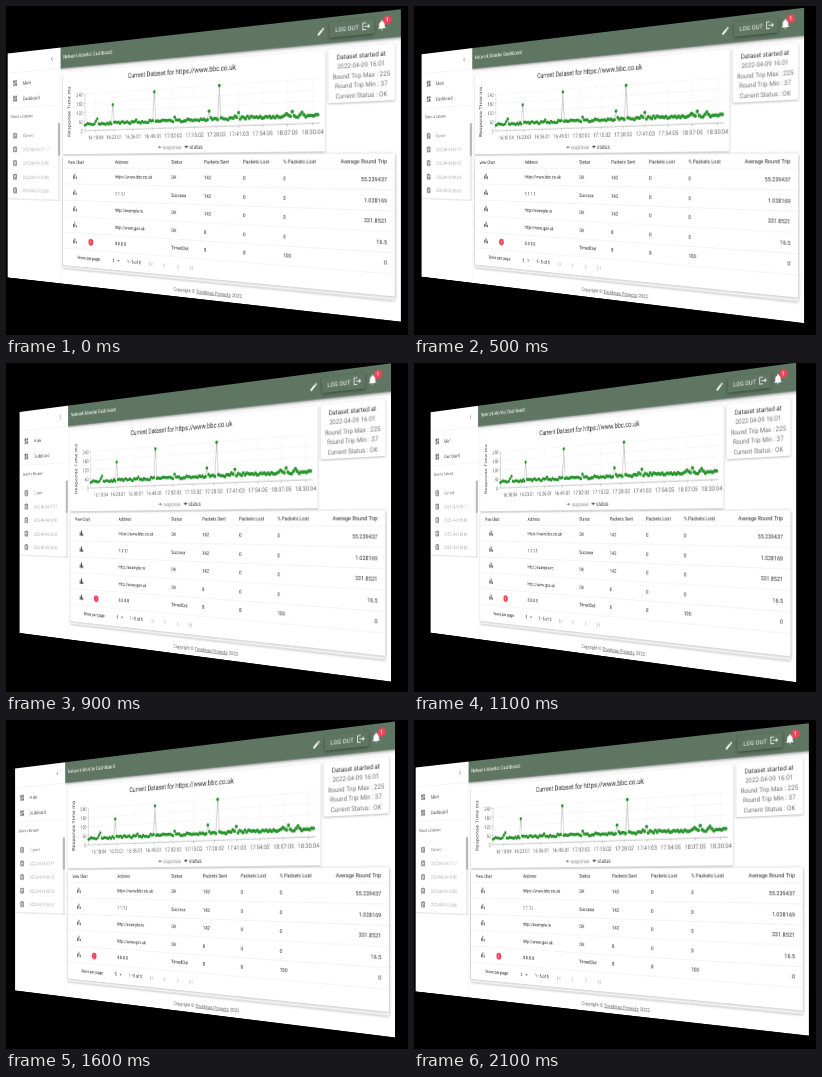
Write an HTML page that moves like this. It is 402 by 329 pixels and loops after 2.3 s.

```html
<!DOCTYPE html>
<html lang="en">
<head>
<meta charset="utf-8">
<title>Network Monitor Dashboard</title>
<style>
  html, body { margin: 0; width: 100%; height: 100%; overflow: hidden; background: #000; }
  #stage {
    position: relative; width: 402px; height: 329px; overflow: hidden;
    perspective: 902px; perspective-origin: 166.2px 159.5px;
  }
  #page {
    position: absolute; left: 0; top: 0; overflow: hidden;
    transform-origin: 0 0; background: #fff;
    clip-path: inset(.56px 1.1px .56px .6px);
    font-family: Roboto, Arial, sans-serif;
    text-rendering: geometricPrecision;
  }
  .card { fill: #fff; filter: drop-shadow(0 2px 2px rgba(0,0,0,.3)); }
  .bar { fill: #5f7663; filter: drop-shadow(0 3px 4px rgba(0,0,0,.4)); }
</style>
</head>
<body>
<div id="stage"><svg id="page" width="540" height="290" viewBox="0 0 1350 725"></svg></div>
<script>
const page = document.getElementById('page');
const DARK = '#2b2b2b', GREY = '#757575', PALE = '#b0b0b0', RED = '#ee4559', GREEN = '#2a942e';

const ICONS = {
  edit: 'M3 17.2V21h3.8L17.8 9.9l-3.7-3.7zM20.7 7a1 1 0 0 0 0-1.4l-2.3-2.3a1 1 0 0 0-1.4 0l-1.9 1.8 3.8 3.8z',
  bell: 'M12 22a2 2 0 0 0 2-2h-4a2 2 0 0 0 2 2zm6-6v-5c0-3.1-1.6-5.6-4.5-6.3V4a1.5 1.5 0 0 0-3 0v.7C7.6 5.4 6 7.9 6 11v5l-2 2v1h16v-1z',
  exit: 'M17 7l-1.4 1.4 2.6 2.6H8v2h10.2l-2.6 2.6L17 17l5-5zM4 5h8V3H4a2 2 0 0 0-2 2v14a2 2 0 0 0 2 2h8v-2H4z',
  tiles: 'M3 13h8V3H3zm0 8h8v-6H3zm10 0h8V11h-8zm0-18v6h8V3z',
  note: 'M19 3h-4.2a3 3 0 0 0-5.6 0H5a2 2 0 0 0-2 2v14a2 2 0 0 0 2 2h14a2 2 0 0 0 2-2V5a2 2 0 0 0-2-2zm-5 14H7v-2h7zm3-4H7v-2h10zm0-4H7V7h10z',
  bars: 'M4 10h4v10H4zM10 4h4v16h-4zM16 13h4v7h-4z',
  prev: 'M15.4 7.4 14 6l-6 6 6 6 1.4-1.4-4.6-4.6z',
  first: 'M18.4 16.6 13.8 12l4.6-4.6L17 6l-6 6 6 6zM6 6h2v12H6z',
  down: 'M7 10l5 5 5-5z'
};

function add(tag, attrs) {
  const el = document.createElementNS('http://www.w3.org/2000/svg', tag);
  for (const k in attrs) el.setAttribute(k, attrs[k]);
  return page.appendChild(el);
}
const rect = (x, y, w, h, attrs) => add('rect', { x, y, width: w, height: h, ...attrs });
const line = (x1, y1, x2, y2, stroke, attrs) => add('line', { x1, y1, x2, y2, stroke, ...attrs });
const dot = (cx, cy, r, fill) => add('circle', { cx, cy, r, fill });

// y is the middle of the line of text
function text(str, x, y, size, fill = DARK, anchor = 'start', attrs = {}) {
  const el = add('text', { x, y: y + size * .36, 'font-size': size, fill, 'text-anchor': anchor, ...attrs });
  el.textContent = str;
  return el;
}
function icon(name, x, y, fill, flip = 1, size = 24) {
  const k = size / 24;
  add('path', { d: ICONS[name], fill, transform: `translate(${x} ${y}) scale(${k * flip} ${k}) translate(-12 -12)` });
}
function badge(label, x, y) {
  dot(x, y, 10, RED);
  text(label, x, y, 13, '#fff', 'middle', { 'font-weight': 500 });
}

function drawHeader() {
  rect(240, -8, 1118, 72, { class: 'bar' });
  text('Network Monitor Dashboard', 252, 30, 16, '#fff');
  icon('edit', 1139, 33, '#fff');
  rect(1162, 13, 119, 37, { class: 'bar', rx: 4 });
  text('LOG OUT', 1178, 31, 15, '#fff', 'start', { 'letter-spacing': '.4' });
  icon('exit', 1260, 31, '#fff');
  icon('bell', 1300, 32, '#fff', 1, 28);
  badge('1', 1314, 21);
}

function drawSidebar() {
  rect(0, 0, 240, 725, { fill: '#fff' });
  line(239.5, 0, 239.5, 725, '#dcdcdc');
  line(0, 64, 240, 64, '#e0e0e0');
  icon('prev', 203, 32, GREY);
  ['Main', 'Dashboard'].forEach((label, i) => {
    icon('tiles', 35, 98 + i * 50, GREY);
    text(label, 72, 98 + i * 50, 16, '#5c5c5c');
  });
  line(0, 176, 240, 176, '#e4e4e4');
  text('Select a Dataset', 16, 204, 14, '#707070');
  ['Current', '2022-04-04 07:17', '2022-04-04 06:00', '2022-04-04 05:03', '2022-04-03 05:00'].forEach((label, i) => {
    const y = 267 + i * 44;
    icon('note', 35, y, '#8c8c8c');
    text(label, 72, y, 15, i ? PALE : '#8c8c8c');
  });
  rect(229, 232, 9, 238, { fill: '#ececec' });
  rect(229, 232, 9, 100, { fill: '#b8b8b8' });
  line(0, 470, 240, 470, '#d0d0d0', { 'stroke-width': 2 });
}

function drawChart() {
  const left = 343, right = 1136, zero = 258, unit = 27.5 / 60, count = 142;
  rect(250, 78, 901, 250, { class: 'card', rx: 4 });
  text('Current Dataset for https://www.bbc.co.uk', 700, 102, 20, DARK, 'middle');
  text('Response Time ms', 0, 0, 17, '#333', 'middle', { transform: 'translate(276 198) rotate(-90)', 'letter-spacing': '.6' });

  const dash = { 'stroke-dasharray': '3 3' };
  for (let v = 0; v <= 240; v += 60) {
    const y = zero - v * unit;
    line(left, y, right, y, '#d0d0d0', dash);
    line(left - 6, y, left, y, '#777');
    text(v, left - 9, y, 16, '#666', 'end');
  }
  const times = ['16:10:04', '16:23:01', '16:36:01', '16:49:01', '17:02:02', '17:15:02',
    '17:28:02', '17:41:03', '17:54:05', '18:07:05', '18:30:04'];
  times.forEach((label, i) => {
    const x = 387 + i * 72.9;
    line(x, 148, x, zero, '#dcdcdc', dash);
    line(x, zero, x, zero + 6, '#777');
    text(label, x, 280, 16, '#666', 'middle');
  });
  line(left, 148, left, zero, '#777');
  line(left, zero, right, zero, '#777');

  const peaks = { 8: 60, 9: 75, 20: 160, 48: 226, 61: 64, 82: 92, 88: 238, 99: 76, 128: 68, 133: 62 };
  let seed = 11;
  const rand = () => (seed = (seed * 16807) % 2147483647) / 2147483647;
  const pts = Array.from({ length: count }, (_, i) => {
    const v = peaks[i] || 36 + rand() * 13 + (rand() > .88 ? 9 : 0);
    return [left + i * (right - left) / count, zero - v * unit];
  });
  add('polyline', { points: pts.join(' '), fill: 'none', stroke: '#909090', 'stroke-width': 1.3 });
  for (const [x, y] of pts) dot(x, y, 4.7, GREEN);

  const key = (label, x, color) => {
    line(x, 311, x + 14, 311, color, { 'stroke-width': 2 });
    dot(x + 7, 311, 3.2, color);
    text(label, x + 18, 311, 16, color);
  };
  key('response', 623, '#8c8c8c');
  key('status', 717, '#444');
}

function drawSummary() {
  rect(1159, 78, 174, 132, { class: 'card', rx: 4 });
  ['Dataset started at', '2022-04-09 16:01', 'Round Trip Max : 225', 'Round Trip Min : 37', 'Current Status : OK']
    .forEach((label, i) => text(label, 1246, 98 + i * 23.8, 16, i ? '#707070' : '#333', 'middle'));
}

function drawTable() {
  rect(250, 334, 1083, 342, { class: 'card', rx: 4 });
  rect(250, 334, 1083, 334, { class: 'card', rx: 4 });
  const cols = [272, 463, 671, 784, 910, 1031, 1313];
  const row = (cells, y) => cells.forEach((c, i) => text(c, cols[i], y, 14, DARK, i === 6 ? 'end' : 'start'));
  row(['View Chart', 'Address', 'Status', 'Packets Sent', 'Packets Lost', '% Packets Lost', 'Average Round Trip'], 352);
  line(250, 370.5, 1333, 370.5, '#dedede');
  [
    ['https://www.bbc.co.uk', 'OK', 142, 0, 0, '55.239437'],
    ['1.1.1.1', 'Success', 142, 0, 0, '1.028169'],
    ['http://example.ro', 'OK', 142, 0, 0, '331.8521'],
    ['http://www.gov.uk', 'OK', 8, 0, 0, '16.5'],
    ['8.8.8.8', 'TimedOut', 8, 8, 100, '0']
  ].forEach((cells, i) => {
    const y = 395 + i * 49;
    row(['', ...cells], y);
    icon('bars', 301, y, '#555');
    line(250, y + 24.5, 1333, y + 24.5, '#dedede');
  });
  badge('!', 367, 592);

  text('Rows per page:', 311, 640, 14);
  text('5', 453, 640, 14);
  icon('down', 477, 640, GREY);
  text('1–5 of 5', 509, 640, 14);
  icon('first', 599, 642, '#bdbdbd');
  icon('prev', 647, 642, '#bdbdbd');
  icon('prev', 695, 642, '#bdbdbd', -1);
  icon('first', 741, 642, '#bdbdbd', -1);
}

function drawFooter() {
  const el = text('Copyright © ', 795, 704, 14, '#666', 'middle');
  el.innerHTML += '<tspan text-decoration="underline">Tovelinas Projects</tspan> 2022.';
}

drawChart();
drawSummary();
drawTable();
drawFooter();
drawHeader();
drawSidebar();

// The page swings in even steps of 100 ms, out and back
function pose(ms) {
  const step = Math.min(20, Math.max(0, Math.floor(ms / 100) - 1));
  const swing = 1 - Math.abs(step - 10) / 10;
  const angle = 37.9 + 5.3 * swing;
  page.style.transform = `translate(166.2px, 159.5px) rotateY(${-angle}deg) scale(.9) translate(-270px, -145px)`;
}

const start = performance.now();
function tick() {
  pose((performance.now() - start) % 2300);
  requestAnimationFrame(tick);
}
tick();
</script>
</body>
</html>
```
